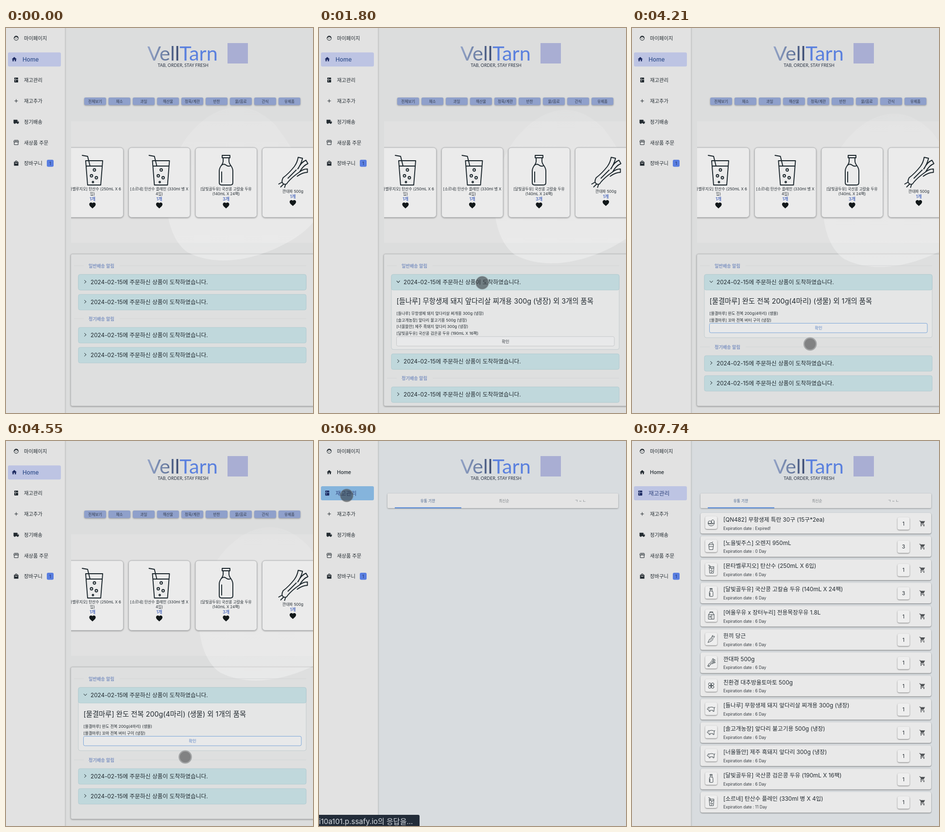
An HTML page that plays this animation: 632 by 792 pixels, repeating every 8000 ms.

```html
<!DOCTYPE html>
<html lang="ko">
<head>
<meta charset="utf-8">
<style>
html, body { margin: 0; width: 100%; height: 100%; overflow: hidden; background: #dcdddd; }
svg { display: block; width: 632px; height: 792px; font-family: Inter, 'Noto Sans CJK KR', sans-serif; }
.soft { filter: drop-shadow(0 1px 1.5px #0005); }
.row { filter: drop-shadow(0 1px 1px #0007); }
.line { fill: none; stroke: #1b262c; stroke-linejoin: round; stroke-linecap: round; }
</style>
</head>
<body>
<svg id="stage" viewBox="0 0 632 792"></svg>
<script>
const INK = '#222a30', BLUE = '#5772c0';

const text = (x, y, s, size, fill = INK, more = '') =>
  `<text x="${x}" y="${y}" font-size="${size}" fill="${fill}" ${more}>${s}</text>`;
const mid = (x, y, s, size, fill, more = '') => text(x, y, s, size, fill, 'text-anchor="middle" ' + more);
const rect = (x, y, w, h, fill, r = 0, more = '') =>
  `<rect x="${x}" y="${y}" width="${w}" height="${h}" rx="${r}" fill="${fill}" ${more}/>`;
const path = (d, more = '') => `<path d="${d}" ${more}/>`;
const dot = (x, y, r) => `<circle cx="${x}" cy="${y}" r="${r}"/>`;
const group = (inner, more = '') => `<g ${more}>${inner}</g>`;
const icon = (x, y, size, inner, fill = INK) =>
  group(inner, `fill="${fill}" stroke="none" fill-rule="evenodd" transform="translate(${x - size / 2} ${y - size / 2}) scale(${size / 24})"`);

// Icons on a 24 unit grid
const HEART = path('M12 21.3l-1.4-1.3C5.4 15.4 2 12.3 2 8.5 2 5.4 4.4 3 7.5 3c1.7 0 3.4.8 4.5 2.1C13.1 3.8 14.8 3 16.5 3 19.6 3 22 5.4 22 8.5c0 3.8-3.4 6.9-8.6 11.5z');
const CART = path('M1 2h3.3l.9 2H21l-4.7 8.5q-.5.5-1.2.5H8l-1 2h12v2H6q-2-1-1-3l1.6-2.5L3 4H1z') + dot(7, 20, 2) + dot(17, 20, 2);
const outline = 'fill="none" stroke="#222a30" stroke-width="2"';
const NAV_ICONS = [
  `<circle cx="12" cy="12" r="9" ${outline}/>` + path('M3 11Q9 11 11 5Q14 10 21 10L18 4 12 2 6 4z') + dot(9, 14, 1.4) + dot(15, 14, 1.4),
  path('M10 20v-6h4v6h5v-8h3L12 3 2 12h3v8z'),
  path('M6 2h12q2 0 2 2v5H4V4q0-2 2-2zM4 11h16v9q0 2-2 2H6q-2 0-2-2zM8 4.500h2v3H8zM8 13h2v5H8z'),
  path('M19 13h-6v6h-2v-6H5v-2h6V5h2v6h6z'),
  path('M1 4h16v4h3l3 4v6H1zM17 9.500h3l2 2.500h-5z') + dot(6, 18, 3) + dot(18, 18, 3),
  path('M4 3h16l2 7H2zM4 11v10h16V11M9 3v7M15 3v7', outline),
  path('M3 6h4a5 5 0 0 1 10 0h4v16H3zM9 6h6a3 3 0 0 0-6 0zM7 9a5 5 0 0 0 10 0h-2a3 3 0 0 1-6 0z')
];

// Food drawings, centred on x = 0 and 64 units high
const FOOD = {
  glass: path('M-21 1L-10 3-5 23M-14 12H21L17 62H-10ZM-13 23H20') + dot(4, 31, 2.5) + dot(-2, 43, 2.5) + dot(8, 47, 2.5) + dot(1, 56, 1.5),
  bottle: path('M-8 1H8V6H-8ZM-6 6V13C-6 21-14 23-14 33V57q0 5 5 5H9q5 0 5-5V33C14 23 6 21 6 13V6M-10 22Q-5 17 0 21T10 22M-9 35V56'),
  leek: path('M-20 47Q-8 38 3 24 9 16 11 5L20 7Q17 19 10 29M-11 57Q-2 46 14 35 21 29 30 29V36Q20 36 9 44M11 28Q17 15 27 11L31 18Q21 22 14 35M-20 47Q-25 56-19 60-13 62-11 57M-22 56l-7 4M-19 60l-6 6M-15 61l-2 6M-10 48L7 31'),
  eggs: '<ellipse cx="-10" cy="28" rx="13" ry="10"/><ellipse cx="12" cy="24" rx="11" ry="14"/>' + path('M-24 36Q0 48 25 34 20 56 0 56-20 56-24 36'),
  juice: path('M-18 20H18L13 60H-13ZM-14 20Q-14 6 0 8 14 6 14 20M4 8L12 0M-14 36H14'),
  milk: path('M-20 24L-10 8H12L22 24V58H-20ZM-20 24H22M4 24V58M-10 8V2H12V8') + dot(-8, 40, 5),
  carrot: path('M-24 58Q-18 34 0 22L14 36Q2 52-24 58M6 22Q2 8 12 4 12 10 12 16 20 8 26 12 24 22 14 28M-10 38l6 5M-2 32l6 5'),
  tomato: dot(-11, 22, 10) + dot(11, 22, 10) + dot(-11, 44, 10) + dot(11, 44, 10) + path('M-6 33H6M0 27V39'),
  pig: path('M-28 30L-20 20-14 22Q4 16 18 22 27 26 22 40V52H14V44H-8V52H-16V42L-28 38ZM22 26q8 0 6-6') + dot(-18, 29, 1)
};
const food = (name, x, y, scale, width) =>
  group(FOOD[name], `class="line" stroke-width="${width}" transform="translate(${x} ${y}) scale(${scale})"`);

const NAV = ['마이페이지', 'Home', '재고관리', '재고추가', '정기배송', '새상품 주문', '장바구니'];
const navY = i => i ? 21.5 + i * 42.8 : 21;
const navItem = i => icon(21, navY(i), 12, NAV_ICONS[i]) + text(37, navY(i) + 4, NAV[i], 10.3, INK, 'font-weight="500"');
const navActive = (i, color, id) =>
  rect(4, navY(i) - 14, 109, 29, '#bdc4e3', 3, `id="${id}"`) + icon(17, navY(i), 12.5, NAV_ICONS[i], '#1d2b62') +
  text(34, navY(i) + 4.5, NAV[i], 11.8, color, 'font-weight="500"');

function sidebar() {
  return rect(0, -5, 121.5, 802, '#e2e2e2', 0, 'class="soft"') +
    [0, 3, 4, 5, 6].map(navItem).join('') +
    rect(84, 271, 14, 14.5, '#597ee0', 3) + mid(91, 282, '1', 9.5, '#263a70') +
    group(navActive(1, '#33508c', 'homeBar') + navItem(2), 'id="navHome"') +
    group(navItem(1) + navActive(2, '#31457f', 'stockBar'), 'id="navStock"');
}

const logo = () =>
  text(291, 67, 'Vell<tspan fill="#5a80de">Tarn</tspan>', 41.5, 'url(#ink)', 'font-family="Lato, sans-serif"') +
  mid(364.500, 80, 'TAB, ORDER, STAY FRESH', 8.9, '#2b3444', 'font-family="Lato, sans-serif"') +
  rect(456, 31, 42, 42, '#a9aed3');

const CATEGORIES = ['전체보기', '채소', '과일', '해산물', '정육/계란', '반찬', '물/음료', '간식', '유제품'];
const categories = () => CATEGORIES.map((s, i) =>
  rect(161 + i * 50, 143, 45, 15.5, '#8fa0cb', 3, 'class="soft"') +
  mid(183.500 + i * 50, 153.700, s, 7.7, '#333b4d', 'font-weight="500"')).join('');

function card(i, name, lines, count) {
  const x = 178 + i * 137.500, end = 334 + (lines.length - 1) * 10 + (lines.length < 2 ? 5 : 0);
  return rect(x - 63, 246, 126.5, 143.500, '#ebebeb', 6, 'stroke="#b6b8ba" class="soft"') +
    food(name, x, 261, 1, 1.9) +
    lines.map((s, k) => mid(x, end - (lines.length - 1 - k) * 10, s, 7.8)).join('') +
    mid(x, end + 11, count + '개', 9, BLUE, 'font-weight="600"') + icon(x, end + 21, 16, HEART, '#111719');
}
const cards = () => group(
  card(0, 'glass', ['[몬타벨루지오] 탄산수 (250mL X 6', '입)'], 1) +
  card(1, 'glass', ['[소르네] 탄산수 플레인 (330ml 병 X', '4입)'], 1) +
  card(2, 'bottle', ['[달빛골두유] 국산콩 고칼슘 두유', '(140mL X 24팩)'], 3) +
  card(3, 'leek', ['깐대파 500g'], 1), 'clip-path="url(#band)"');

const label = (y, s) =>
  path(`M140 ${y}H160M234 ${y}H618`, 'stroke="#d3d5d6"') + text(170, y + 4, s, 9.2, '#7f94c2', 'font-weight="600"');
const alertBar = (y, id = '') =>
  rect(149, y, 469, 32, '#c0d8dc', 3.500, 'stroke="#abc8ce" stroke-width=".8"') +
  path(`M161.500 ${y + 12}l3.500 3-3.500 3`, `class="line" stroke-width="1" ${id}`) +
  text(174, y + 20, '2024-02-15에 주문하신 상품이 도착하였습니다.', 11.75);

function details(id, title, lines, color, border) {
  const y = 580 + lines.length * 13.700;
  return group(text(159.500, 567, title, 14.35) +
    lines.map((s, k) => text(159.500, 590 + k * 13.6, s, 8.1)).join('') +
    rect(159.500, y, 448.500, 19.500, '#e8e9ea', 3, `stroke="${border}"`) +
    mid(384, y + 13, '확인', 8.3, color, 'font-weight="500"'), `id="${id}"`);
}

const alerts = () => group(
  label(489, '일반배송 알림') +
  `<rect id="box" x="149" y="507" width="469" height="32" rx="4" fill="#e5e6e6" stroke="#c3cccf"/>` +
  group(
    details('first', '[들나루] 무항생제 돼지 앞다리살 찌개용 300g (냉장) 외 3개의 품목', [
      '[들나루] 무항생제 돼지 앞다리살 찌개용 300g (냉장)', '[솔고개농장] 앞다리 불고기용 500g (냉장)',
      '[너울뜰안] 제주 흑돼지 앞다리 300g (냉장)', '[달빛골두유] 국산콩 검은콩 두유 (190mL X 16팩)'], '#343a40', '#c6c8ca') +
    details('second', '[물결마루] 완도 전복 200g(4마리) (생물) 외 1개의 품목', [
      '[물결마루] 완도 전복 200g(4마리) (생물)', '[물결마루] 꼬마 전복 버터 구이 (냉장)'], '#5a83c4', '#7da6d8'),
    'clip-path="url(#reveal)"') +
  alertBar(507, 'id="chevron"') +
  group(alertBar(548), 'id="next"') +
  group(label(598, '정기배송 알림') + alertBar(616) + alertBar(657), 'id="below"'),
  'clip-path="url(#panel)"');

const BLOB = 'M470 163C405 168 348 240 334 310 322 375 340 440 375 462 400 475 430 479 455 478 540 476 640 415 640 380 640 330 600 260 555 200 530 175 500 160 470 163Z';
const home = () => group(
  rect(134, 192, 498, 250, '#e1e1e1') +
  rect(133.500, 465, 510, 312.500, '#dedfdf', 3, 'stroke="#bcbebf" class="soft"') +
  path(BLOB, 'id="blob" fill="url(#glow)"') + categories() + cards() + alerts(), 'id="home"');

const STOCK = [
  ['eggs', '[QN482] 무항생제 특란 30구 (15구*2ea)', 'Expired!', 1],
  ['juice', '[노을빛주스] 오렌지 950mL', '0 Day', 3],
  ['glass', '[몬타벨루지오] 탄산수 (250mL X 6입)', '6 Day', 1],
  ['bottle', '[달빛골두유] 국산콩 고칼슘 두유 (140mL X 24팩)', '6 Day', 3],
  ['milk', '[여울우유 x 장터누리] 전용목장우유 1.8L', '6 Day', 1],
  ['carrot', '한끼 당근', '6 Day', 1],
  ['leek', '깐대파 500g', '6 Day', 1],
  ['tomato', '친환경 대추방울토마토 500g', '6 Day', 1],
  ['pig', '[들나루] 무항생제 돼지 앞다리살 찌개용 300g (냉장)', '6 Day', 1],
  ['pig', '[솔고개농장] 앞다리 불고기용 500g (냉장)', '6 Day', 1],
  ['pig', '[너울뜰안] 제주 흑돼지 앞다리 300g (냉장)', '6 Day', 1],
  ['bottle', '[달빛골두유] 국산콩 검은콩 두유 (190mL X 16팩)', '6 Day', 1],
  ['glass', '[소르네] 탄산수 플레인 (330ml 병 X 4입)', '11 Day', 1]
];
function stockRow([name, title, left, count], i) {
  const y = 148 + i * 47.83;
  return rect(141, y, 475, 42.500, '#e9e9e9', 4, 'class="row"') +
    rect(150.500, y + 7, 25, 26, '#eeeeee', 4, 'class="row"') + food(name, 163, y + 11.500, .27, 3) +
    text(188, y + 17.800, title, 11.7) + text(188, y + 34.500, 'Expiration date : ' + left, 8.3, '#343a40') +
    rect(546.500, y + 9, 25, 25.500, '#eeeeee', 4, 'class="row"') + mid(559, y + 25.500, count, 10.5) +
    icon(598, y + 21.500, 14, CART, '#505356');
}
const stock = () => group(
  rect(122, 0, 510, 792, '#d8dcdf') +
  rect(141, 108, 475, 30, '#e4e4e4', 2, 'class="soft"') +
  mid(224, 126, '유통 기한', 7.7, '#45618c') + mid(381, 126, '최신순', 7.7, '#7b8085') + mid(538, 126, 'ㄱ ~ ㄴ', 7.7, '#7b8085') +
  rect(156, 136.500, 137, 2, '#4f84d8') +
  group(STOCK.map(stockRow).join(''), 'id="list"'), 'id="stock"');

const clip = (id, x, y, w, h) => `<clipPath id="${id}">${rect(x, y, w, h, '#000')}</clipPath>`;
const stop = (at, color, alpha = 1) => `<stop offset="${at}" stop-color="${color}" stop-opacity="${alpha}"/>`;
const stage = document.getElementById('stage');
stage.innerHTML = `<defs>
  <linearGradient id="ink" gradientUnits="userSpaceOnUse" x1="292" x2="370">
    ${stop(0, '#93a3c6')}${stop(.5, '#66799f')}${stop(1, '#1f2d55')}
  </linearGradient>
  <linearGradient id="glow" x2="0" y2="1">${stop(0, '#fff', .1)}${stop(1, '#fff', .32)}</linearGradient>
  ${clip('band', 134, 192, 498, 250)}${clip('panel', 134, 465, 498, 312)}
  <clipPath id="reveal"><rect id="window" x="149" y="539" width="470" height="0"/></clipPath></defs>` +
  rect(0, 0, 632, 792, '#dcdddd') + home() + stock() + logo() + sidebar() +
  group(rect(-5, 769, 212, 30, '#222c39', 3) + text(0, 788, 'i10a101.p.ssafy.io의 응답을...', 15, '#d5dae0'), 'id="status"') +
  '<circle id="cursor" r="12.5" stroke-width="2.5"/>';

const $ = id => document.getElementById(id);
const set = (id, attrs) => Object.entries(attrs).forEach(([k, v]) => $(id).setAttribute(k, v));
const show = (id, on) => { $(id).style.display = on ? '' : 'none'; };
const ramp = (t, a, b) => Math.min(1, Math.max(0, (t - a) / (b - a)));
const ease = (t, a, b) => { const p = ramp(t, a, b); return p * p * (3 - 2 * p); };
const within = (t, a, b) => t >= a && t < b;

function drawCursor(t) {
  const down = ease(t, 2480, 3050), left = ease(t, 6000, 6420), settle = ramp(t, 6420, 6480);
  const x = 336 + 28 * down + 5 * ease(t, 4000, 4400) - 309 * left - 3 * settle;
  const y = 524 + 126 * down - 532 * left - 6 * settle;
  const alpha = ramp(t, 1150, 1300) - ramp(t, 4850, 5000) + ramp(t, 5880, 5960) - ramp(t, 7100, 7280);
  const pressed = within(t, 1560, 1870) || within(t, 3840, 3980) || within(t, 6540, 7000);
  set('cursor', {
    cx: x, cy: y, opacity: alpha,
    fill: pressed ? '#30363a90' : '#6c6d6ed0', stroke: pressed ? '#5d636788' : '#a3a5a6'
  });
}

function draw(t) {
  const s = t / 1000, open = ease(t, 1635, 1820), swapped = t >= 3940, moved = t >= 6620;
  const height = swapped ? 98 : 126 * open;
  set('blob', { transform: `translate(${18.3 * s - .82 * s * s} ${3.2 * s})` });
  set('box', { height: 32 + height });
  set('window', { height });
  set('chevron', { transform: `rotate(${90 * open} 163.2 522)` });
  set('next', { transform: `translate(0 ${height})` });
  set('below', { transform: `translate(0 ${swapped ? 58 : height})` });
  show('first', !swapped);
  show('second', swapped);
  show('next', !swapped);
  show('home', !moved);
  show('navHome', !moved);
  show('stock', moved);
  show('navStock', moved);
  show('list', t >= 7180);
  show('status', within(t, 6690, 7180));
  set('stockBar', { fill: t < 7250 ? '#85b4dc' : '#bdc4e3' });
  drawCursor(t);
}

const start = performance.now();
(function tick() {
  draw((performance.now() - start) % 8000);
  requestAnimationFrame(tick);
})();
</script>
</body>
</html>
```
